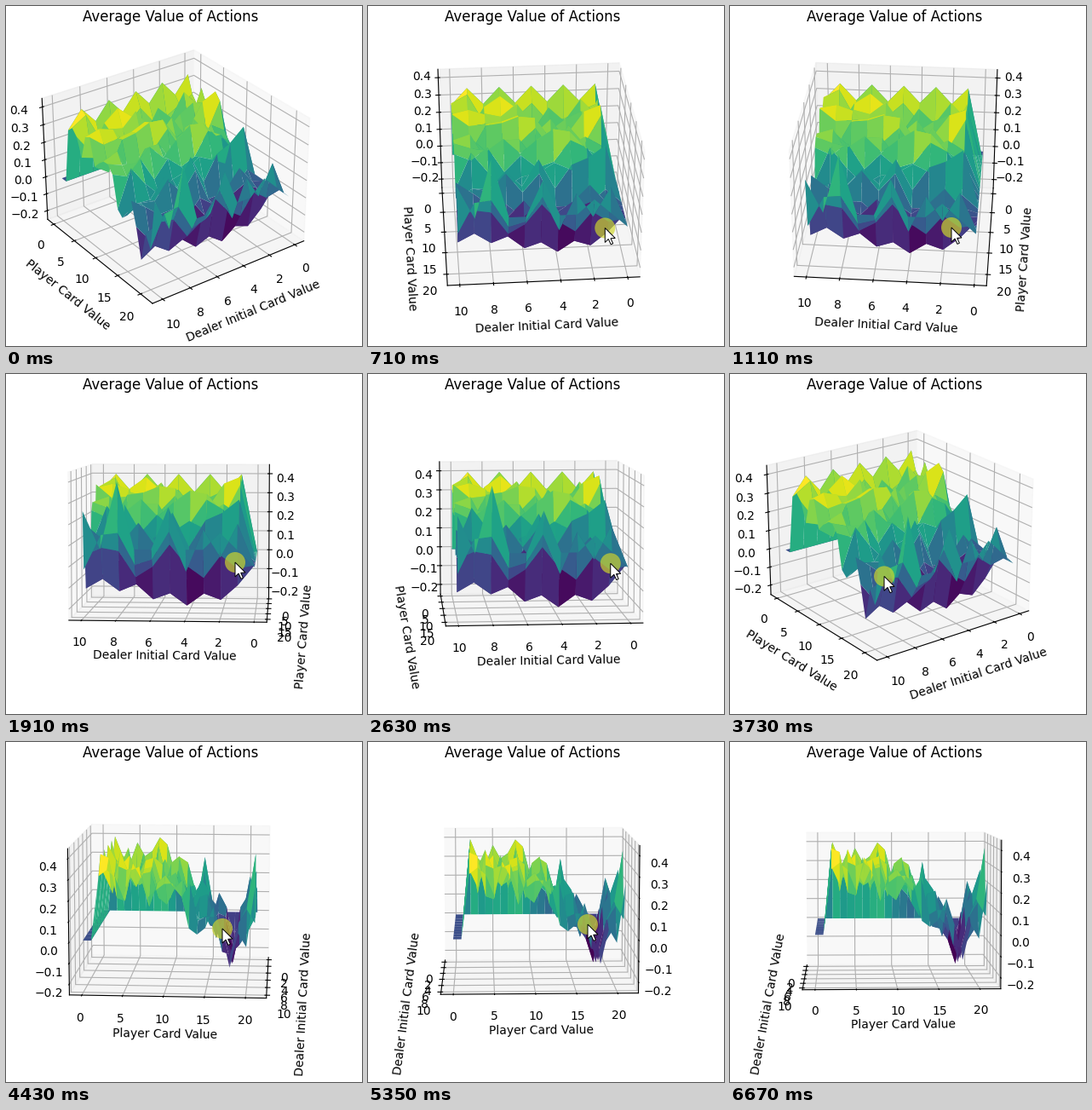
A matplotlib script that plays this animation: 418 px wide and 399 px high, repeating every 6770 ms.

```python
import numpy as np
import matplotlib.pyplot as plt
from matplotlib.animation import FuncAnimation
from matplotlib.patches import Circle, Polygon
from matplotlib.transforms import IdentityTransform

W, H, DPI = 418, 399, 100
LOOP, FRAMES = 6770, 67
STEP = LOOP / FRAMES

# Key poses: time (ms), azimuth, elevation, pointer x, pointer y
POSES = np.array([
    (150, 54, 30, 338, 262),
    (1110, 95, 29.7, 260, 260),
    (1910, 94, 5, 269, 221),
    (2700, 85, 7, 286, 222),
    (3230, 85, 29.7, 135, 249),
    (4430, 4, 10, 254, 219),
    (5350, -2, 8, 258, 214),
    (6250, -2, 5, 258, 208)])
POINTER_ON, POINTER_OFF = 150, 6300

ARROW = np.array([(0, 0), (0, 17), (4, 13), (7, 19.4), (9.4, 18.2),
                  (6.7, 12.3), (12, 12)])


def pose_at(t):
    """Ease between the two key poses around time t."""
    times = POSES[:, 0]
    k = np.clip(np.searchsorted(times, t) - 1, 0, len(times) - 2)
    s = np.clip((t - times[k]) / (times[k + 1] - times[k]), 0, 1)
    s = s * s * (3 - 2 * s)
    return POSES[k, 1:] + s * (POSES[k + 1, 1:] - POSES[k, 1:])


def action_values(dealer, player):
    """Noisy plateau, a valley near a total of 18 and a ridge at 21."""
    rng = np.random.default_rng(21)
    z = np.interp(player, [2, 11, 16, 18, 21], [.3, .24, .06, -.1, .17])
    z += rng.uniform(-.11, .11, z.shape)
    z[3:13] = np.maximum(z[3:13], .13)
    d = dealer[0]
    z[2] = .36 - .05 * (-1.0) ** d
    z[18] = -.07 - .08 * np.exp(-((d - 4) / 3) ** 2) - .05 * (d % 2 == 0)
    z[21] = .08 + .04 * d * (d % 3 == 2) + .18 * (d == d.max())
    z[8::6, 1] = np.linspace(.4, .2, 3)
    z[(player < 2) | (dealer < 1)] = 0
    return np.clip(z, -.208, .403)


def padded(low, high):
    """Limits with the 5 % data margin and the 1/48 view margin."""
    pad = (high - low) * (.05 + 1.1 / 48)
    return low - pad, high + pad


fig = plt.figure(figsize=(W / DPI, H / DPI), dpi=DPI, facecolor="white")
side = 342
ax = fig.add_axes([22 / W, 30.4 / H, side / W, side / H], projection="3d")

dealer, player = np.meshgrid(np.arange(11), np.arange(22))
ax.plot_surface(dealer, player, action_values(dealer, player), cmap="viridis")
ax.set_xlim(*padded(0, 10))
ax.set_ylim(*padded(0, 21))
ax.set_zlim(*padded(-.208, .403))
ax.set_xticks(range(0, 11, 2))
ax.set_yticks(range(0, 21, 5))
ax.set_zticks(np.arange(-2, 5) / 10)
ax.set_xlabel("Dealer Initial Card Value")
ax.set_ylabel("Player Card Value")
# 3D axes lower the title, so put it back on the top edge.
ax.set_title("Average Value of Actions", y=1.0).set_y(1.0)
ax.title.set_y(1.0)

pixels = IdentityTransform()
halo = Circle((0, 0), 12, fc="#cfd62c", ec="none", alpha=.68, zorder=10,
              transform=pixels)
arrow = Polygon(ARROW, closed=True, fc="white", ec="black", lw=.7, zorder=11,
                transform=pixels)
fig.add_artist(halo)
fig.add_artist(arrow)


def update(i):
    t = (i + 1) * STEP
    azim, elev, x, y = pose_at(t)
    ax.view_init(elev=elev, azim=azim)
    halo.center = x, H - y
    arrow.set_xy(np.column_stack((x + ARROW[:, 0], H - y - ARROW[:, 1])))
    for part in (halo, arrow):
        part.set_visible(POINTER_ON <= t < POINTER_OFF)
    return halo, arrow


anim = FuncAnimation(fig, update, frames=FRAMES, interval=STEP, repeat=True,
                     repeat_delay=0, blit=False)
plt.show()
```
